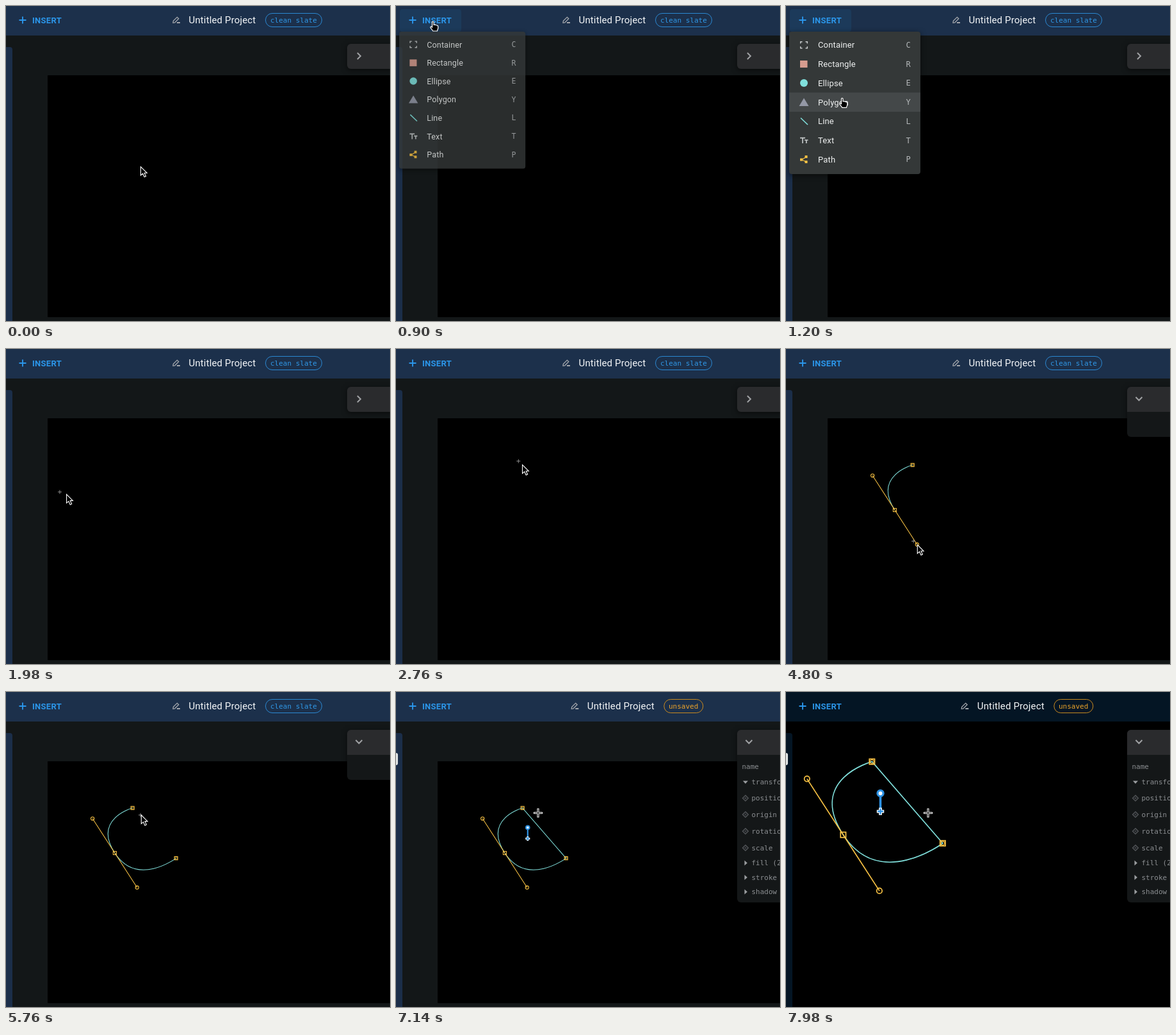
An HTML page that plays this animation: 600x491 px, repeating every 8 s.

```html
<!DOCTYPE html>
<html lang="en">
<head>
<meta charset="utf-8">
<title>Drawing a path</title>
<style>
  html, body { margin: 0; height: 100%; overflow: hidden; background: #131718; }
  svg { display: block; width: 100vw; height: 100vh; }
  text { font-family: Roboto, sans-serif; dominant-baseline: central; }
  .mono { font-family: "DejaVu Sans Mono", monospace; font-size: 11px; }
  .title { font-size: 15px; letter-spacing: .15px; fill: #f4f6f8; }
  .item { font-size: 13px; letter-spacing: .15px; fill: #eef0f0; }
  .key { font-size: 12px; fill: #b4b8ba; text-anchor: middle; }
  .prop { fill: #8b8e91; }
  .line { fill: none; }
  .node { fill: none; stroke: #f8c244; stroke-width: 1.05; }
  .shadow { filter: drop-shadow(0 2px 4px rgba(0, 0, 0, .55)); }
  #menu { transform-origin: 5px 40px; }
</style>
</head>
<body>
<svg viewBox="0 0 600 491" preserveAspectRatio="none">
  <rect width="600" height="491" fill="#131718"/>

  <g id="artboard">
    <rect x="65" y="108" width="900" height="377"/>
    <path id="curve" class="line" stroke="#80e0dc" stroke-width="1.05"/>
    <path id="arms" class="line" stroke="#f8c244" stroke-width="1.05"/>
    <g id="nodes"></g>
    <g id="gizmo">
      <path d="M205.8 212V227" stroke="#2d92e4" stroke-width="2.2"/>
      <circle cx="205.8" cy="211.2" r="2.8" fill="#fff" stroke="#2d92e4" stroke-width="2"/>
      <path d="M205.8 225V232M202.3 228.5H209.3" stroke="#fff" stroke-width="3"/>
      <path d="M205.8 225.8V231.2M203.1 228.5H208.5" stroke="#2d92e4" stroke-width="1.5"/>
    </g>
  </g>

  <rect id="side" x="-10" y="64" width="20" height="440" rx="4"/>
  <rect id="tab" x="-6" y="95" width="9" height="19" rx="3" fill="#dfe3e3"/>
  <rect id="header" width="600" height="46"/>

  <rect id="hover" x="6" y="5" width="96" height="35" rx="4" fill="#2196f3" opacity=".09"/>
  <path d="M20.5 22H31.5M26 16.5V27.5" stroke="#2b96ea" stroke-width="1.9"/>
  <text x="41" y="22.4" font-size="13" font-weight="700" letter-spacing=".3" fill="#2b96ea">INSERT</text>

  <g id="project">
    <g class="line" stroke="#a2a5ab" stroke-width="1.3">
      <path d="M261 26.2L261.4 23.4L267.4 17.4L269.8 19.8L263.8 25.8Z"/>
      <path d="M267 26H272" stroke-width="2"/>
    </g>
    <text class="title" x="285.5" y="22.4">Untitled Project</text>
  </g>
  <g id="clean">
    <rect class="line" x="405.5" y="11.5" width="88" height="21" rx="10.5" stroke="#2b88d2"/>
    <text class="mono" x="413" y="22" fill="#2f97e6">clean slate</text>
  </g>
  <g id="unsaved">
    <rect class="line" x="418.8" y="11.5" width="61" height="21" rx="10.5" stroke="#c98a20"/>
    <text class="mono" x="426" y="22" fill="#eda32a">unsaved</text>
  </g>

  <g class="shadow">
    <rect id="panel" x="533" y="59" width="90" rx="6" fill="#141718"/>
    <rect x="533" y="59" width="90" height="39" rx="6" fill="#2a2b2d"/>
    <rect id="panelSeam" x="533" y="90" width="90" height="8" fill="#2a2b2d"/>
  </g>
  <path id="chevron" class="line" stroke="#a0a2a4" stroke-width="2"/>
  <g id="props"></g>

  <g id="menu">
    <rect class="shadow" x="5" y="40" width="205" height="222" rx="4" fill="#343838"/>
    <rect id="row" x="5" width="205" height="30" fill="#444849"/>
    <path class="line" stroke="#c3c7c8" stroke-width="1.5" d="M22.7 58.5V55.7H25.5M30.5 55.7H33.3V58.5M33.3 63V65.8H30.5M25.5 65.8H22.7V63"/>
    <rect x="22" y="85" width="11.5" height="11" fill="#d69c8f"/>
    <circle cx="28" cy="120" r="6" fill="#80e0dc"/>
    <path d="M20.5 156L28 143.5L35.5 156Z" fill="#9498a6"/>
    <path d="M23 174.5L34 185" stroke="#80e0dc" stroke-width="1.6"/>
    <path class="line" stroke="#c3c7c8" stroke-width="1.7" d="M22 205.7H30M26 205.7V214M29 209H34.5M31.8 209V214"/>
    <g fill="#f8c244" stroke="#f8c244">
      <path class="line" stroke-width="1.2" d="M31.5 235.5L24.5 239.5L31.5 243"/>
      <rect x="30" y="233.5" width="3" height="3"/>
      <rect x="22.5" y="238" width="3" height="3"/>
      <rect x="30" y="241.5" width="3" height="3"/>
    </g>
  </g>

  <path id="plus" d="M-3 0H3M0 -3V3" stroke="#9a9a9a" stroke-width=".9"/>
  <g id="pointer">
    <g id="ring" class="line" stroke="#dcdcdc" stroke-width="1">
      <circle r="20.5"/>
      <circle r="18"/>
    </g>
    <path id="arrow" d="M.5 .5V14L3.7 11.2L6.2 16.6L8.6 15.5L6.2 10.3H10.3Z" fill="#000" stroke="#fff" stroke-width="1.1"/>
    <path id="hand" d="M-1.5 0.5C-1.5 -1.2 .9 -1.2 1 .5V4.4L2.8 4.1L4.6 4.7L6.3 5.2Q7.8 5.6 7.8 7.5V9.5L6.4 14H-.2L-4.2 8.6Q-4.3 6.6 -2.4 7.4L-1.5 8.4Z" fill="#000" stroke="#fff" stroke-width="1.2" stroke-linejoin="round"/>
    <g id="cross">
      <path d="M-7 0H7M0 -7V7" stroke="#fff" stroke-width="3.1"/>
      <path d="M-6 0H6M0 -6V6" stroke="#111" stroke-width="1.2"/>
    </g>
  </g>
</svg>

<script>
const LOOP = 8000;
const OPEN_MENU = 800, CLOSE_MENU = 1740, START = 3120, PRESS = 4080, RELEASE = 4800, ADD = 5300, FINISH = 6060, ZOOM = 7510;
const P0 = [197.7, 180.8], P1 = [170, 251], P2 = [265.7, 259.1], HANDLE = [204.8, 304.7];

// Pointer stops: time, x, y
const stops = [
  [0, 210, 250], [180, 210, 250], [660, 58, 25], [900, 58, 25],
  [1200, 88, 144], [1460, 72, 236], [1740, 72, 236], [2640, 197, 180],
  [3240, 197, 180], [3900, 170, 251], [4180, 170, 251], [4700, ...HANDLE],
  [4860, ...HANDLE], [5220, ...P2], [5460, ...P2], [5760, 211, 191.5],
  [5900, ...P0], [6120, ...P0], [6540, 222, 188.5], [LOOP, 222, 188.5]
];
const presses = [[700, 820], [1620, CLOSE_MENU], [3060, 3200], [PRESS, RELEASE], [5240, 5380], [5940, FINISH]];

const el = id => document.getElementById(id);
const show = (id, on) => el(id).setAttribute('visibility', on ? 'visible' : 'hidden');
const set = (id, name, value) => el(id).setAttribute(name, value);
const clamp = v => Math.min(1, Math.max(0, v));
const smooth = v => (v = clamp(v), v * v * (3 - 2 * v));
const mix = (a, b, k) => `rgb(${a.map((v, i) => Math.round(v + (b[i] - v) * k))})`;
const same = (a, b) => a[1] === b[1] && a[2] === b[2];

// Velocity at a stop: zero next to a rest
function velocity(i, axis) {
  const a = stops[i - 1], b = stops[i], c = stops[i + 1];
  if (!a || !c || same(a, b) || same(b, c)) return 0;
  return (c[axis] - a[axis]) / (c[0] - a[0]);
}

function pointerAt(t) {
  t = Math.max(0, t);
  const i = stops.findIndex((s, n) => n === stops.length - 2 || t < stops[n + 1][0]);
  const a = stops[i], b = stops[i + 1], span = b[0] - a[0], u = (t - a[0]) / span;
  return [1, 2].map(axis =>
    a[axis] + (b[axis] - a[axis]) * u * u * (3 - 2 * u) +
    span * (velocity(i, axis) * u * (1 - u) ** 2 - velocity(i + 1, axis) * u * u * (1 - u)));
}

const square = ([x, y], filled) =>
  `<rect class="node" x="${x - 2.55}" y="${y - 2.55}" width="5.1" height="5.1"${filled ? ' style="fill:#f8c244"' : ''}/>`;
const dot = ([x, y], r) => `<circle class="node" cx="${x}" cy="${y}" r="${r}"/>`;
const core = ([x, y]) => `<circle class="node" cx="${x}" cy="${y}" r="1.8" style="stroke-width:.7"/>`;

function drawPath(t, pointer) {
  const dragged = t >= RELEASE ? HANDLE : t > 4180 ? pointer : P1;
  const mirror = P1.map((v, i) => 2 * v - dragged[i]);
  const bent = dragged !== P1;
  let curve = '', nodes = '';
  if (t >= START) nodes += square(P0) + core(P0);
  if (t >= PRESS) {
    curve = `M${P0}C${P0} ${mirror} ${P1}`;
    nodes += square(P1, !bent);
    if (bent) nodes += dot(mirror, 2.6) + dot(dragged, 2.6);
  }
  if (t >= ADD) {
    curve += `C${dragged} ${P2} ${P2}`;
    nodes += square(P2, t < 5380) + core(P2);
  }
  if (t >= FINISH) curve += 'Z';
  set('curve', 'd', curve);
  set('arms', 'd', bent ? `M${mirror}L${dragged}` : '');
  el('nodes').innerHTML = nodes;
  show('gizmo', t >= FINISH);
}

function drawChrome(t) {
  const done = t >= FINISH, open = t >= START;
  const zoom = smooth((t - ZOOM) / 470), scale = 1 + .625 * zoom;
  set('artboard', 'transform', `translate(299 296.4) scale(${scale}) translate(-299 -296.4)`);
  set('header', 'fill', mix([28, 48, 75], [4, 21, 36], smooth((zoom - .4) / .6)));
  set('side', 'fill', mix([27, 46, 73], [4, 21, 36], smooth((zoom - .25) / .5)));

  show('tab', done);
  show('clean', !done);
  show('unsaved', done);
  set('project', 'transform', `translate(${done ? 13.3 : 0} 0)`);

  set('panel', 'height', done ? 269 : open ? 78 : 39);
  show('panelSeam', open);
  set('chevron', 'd', open ? 'M546.5 75L551.5 80L556.5 75' : 'M549 73L554 78L549 83');
  show('props', done);
}

function drawMenu(t, [x, y]) {
  const grow = smooth((t - OPEN_MENU) / 140), fade = clamp((t - CLOSE_MENU) / 140);
  el('menu').style.opacity = grow * (1 - fade);
  el('menu').style.transform = `scale(${.8 + .2 * grow})`;
  const row = Math.floor((y - 45.6) / 29.75);
  show('row', row >= 0 && row < 7 && x < 210 && t < CLOSE_MENU + 140);
  set('row', 'y', 45.6 + row * 29.75);
  show('hover', (x < 102 && y < 40) || (t > OPEN_MENU && t < CLOSE_MENU + 100));
}

function drawPointer(t, [x, y]) {
  const onButton = x < 102 && y < 42;
  const kind = t >= FINISH ? 'cross' : onButton || (t > OPEN_MENU && t < CLOSE_MENU) ? 'hand' : 'arrow';
  for (const name of ['arrow', 'hand', 'cross']) show(name, name === kind);
  show('ring', presses.some(([a, b]) => t >= a && t < b));
  set('pointer', 'transform', `translate(${x} ${y})`);
  const [px, py] = pointerAt(t - 28);
  show('plus', t > CLOSE_MENU && t < FINISH && px > 71 && py > 114);
  set('plus', 'transform', `translate(${px - 5.7} ${py - 5.2})`);
}

// Menu labels and property rows
['Container C', 'Rectangle R', 'Ellipse E', 'Polygon Y', 'Line L', 'Text T', 'Path P'].forEach((entry, i) => {
  const [label, key] = entry.split(' '), y = 60.8 + i * 29.75;
  el('menu').insertAdjacentHTML('beforeend',
    `<text class="item" x="50" y="${y}">${label}</text><text class="mono key" x="191" y="${y}">${key}</text>`);
});
const marks = {
  open: y => `<path d="M542 ${y - 2}H550L546 ${y + 2.5}Z" fill="#9a9da0"/>`,
  shut: y => `<path d="M544.5 ${y - 4}V${y + 4}L549 ${y}Z" fill="#9a9da0"/>`,
  key: y => `<path d="M546 ${y - 4.5}L550.5 ${y}L546 ${y + 4.5}L541.5 ${y}Z" fill="#1c1f21" stroke="#56595c" stroke-width="1.2"/><path d="M544.5 ${y}H547.5M546 ${y - 1.5}V${y + 1.5}" stroke="#46494c"/>`
};
el('props').innerHTML = '<text class="mono prop" x="540.5" y="116.3">name</text>' + [
  ['transform', 140.5, 'open'], ['position', 165.5, 'key'], ['origin', 191, 'key'], ['rotation', 217, 'key'],
  ['scale', 243, 'key'], ['fill (2)', 266.5, 'shut'], ['stroke', 289, 'shut'], ['shadow', 311.5, 'shut']
].map(([label, y, mark]) => `${marks[mark](y)}<text class="mono prop" x="555.5" y="${y}">${label}</text>`).join('');

const begin = performance.now();
function frame() {
  const t = (performance.now() - begin) % LOOP;
  const pointer = pointerAt(t);
  drawChrome(t);
  drawPath(t, pointer);
  drawMenu(t, pointer);
  drawPointer(t, pointer);
  requestAnimationFrame(frame);
}
frame();
</script>
</body>
</html>
```
